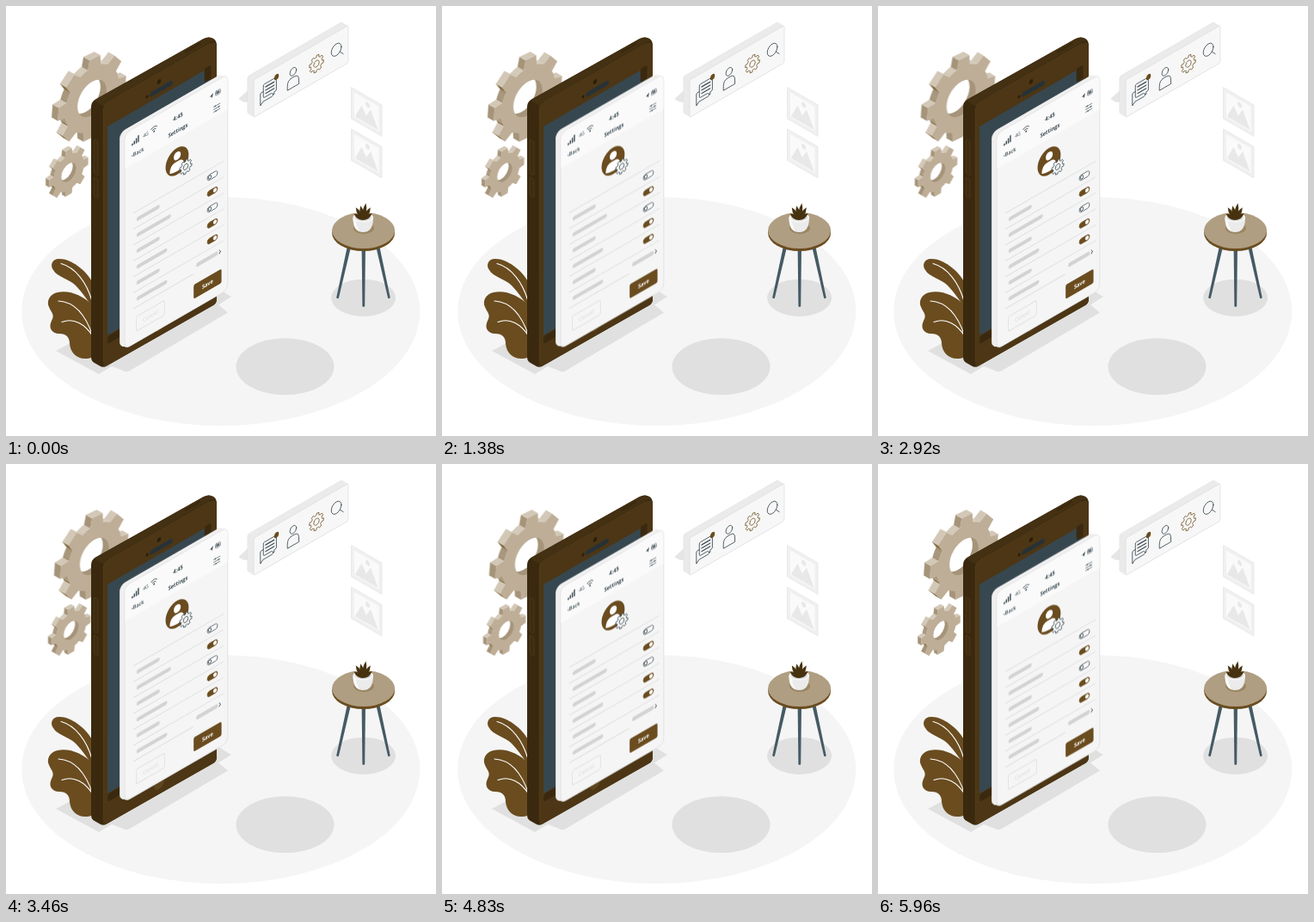
An HTML page that plays this animation: 500x500 px, repeating every 6000 ms.

```html
<!DOCTYPE html>
<html lang="en">
<head>
<meta charset="utf-8">
<title>Settings</title>
<style>
  html, body { margin: 0; width: 100%; height: 100%; overflow: hidden; background: #fff; }
  svg { display: block; width: 100vw; height: 100vh; }
  text { font-family: "Open Sans", "Noto Sans", sans-serif; font-weight: 700; fill: #37474f; }
  .mid { text-anchor: middle; }
  .line { fill: none; stroke: #37474f; stroke-width: .8; stroke-linecap: round; stroke-linejoin: round; }
  #panel { animation: float 1.5s linear -40ms infinite; }
  #gears { animation: shake 6s linear -40ms infinite; }
  @keyframes float {
    50% { transform: translateY(-10px); }
  }
  @keyframes shake {
    0%, 100% { transform: translateX(0); }
    10%, 90% { transform: translateX(-1px); }
    20%, 80% { transform: translateX(2px); }
    30%, 50%, 70% { transform: translateX(-4px); }
    40%, 60% { transform: translateX(4px); }
  }
</style>
</head>
<body>
<svg viewBox="0 0 500 500">
  <!-- floor and shadows -->
  <ellipse cx="249.7" cy="355" rx="231.5" ry="133" fill="#f5f5f5"/>
  <g fill="#e0e0e0">
    <ellipse cx="324.5" cy="419.3" rx="57" ry="33"/>
    <ellipse cx="415.6" cy="339.3" rx="37.5" ry="21.6"/>
    <path d="M58 401L104 376 245 328 262 338 247 347.500 258 356.500 144 424Q140 426.500 136 424L123 419 108 428Z"/>
  </g>

  <!-- wall pictures -->
  <g id="pictures"></g>

  <!-- leaves -->
  <g fill="#6a4c1f">
    <path d="M101 322C93 307 76 294 62 294 53 294 51 302 55 307 59 315 73 317 81 325 89 333 96 344 101 351Z"/>
    <path d="M102 349C89 336 73 330 60 333 50 335 47 344 50 350 53 357 57 359 53 366 49 374 53 381 62 381 70 381 74 385 74 393 75 403 82 410 92 410 98 410 103 408 104 404Z"/>
    <g fill="none" stroke="#fff" stroke-width="1.1" stroke-linecap="round">
      <path d="M64 299.500C81 304 94 322 100 343"/>
      <path d="M61 343C80 344 93 360 101 384M65 367.500C79 362 92 370 101 384"/>
    </g>
  </g>

  <g id="gears"></g>

  <!-- phone -->
  <path d="M99 117Q99 111.500 104 108.500L229 38.500Q236 34.800 241.500 38.200 245 40.500 245 46V341Q245 345.500 241 348L117 418.500Q113 421 109 418.500L102 414.500Q99 412.500 99 408Z" fill="#3a290f"/>
  <path d="M102.500 110L229 38.500Q236 34.800 241.500 38.200L243 41Q239 41 235 43.300L118 111.500Q115 113.500 114 116.500Z" fill="#443012"/>
  <path d="M113 122Q113 115 118.500 111.700L236 44Q245 39.500 245 48V341Q245 345.500 241 348L117 418.500Q113 421 113 415Z" fill="#4c3615"/>
  <path d="M113.200 413V122Q113.200 115.500 118.500 111.700L236 44" fill="none" stroke="#5c441f" stroke-width=".5"/>
  <path d="M208 52.500L226 42.200V44.800L208 55.200Z" fill="#3a290f"/>
  <g fill="#3f2c10" stroke="#57411d" stroke-width=".6">
    <path d="M102 156Q104 154 107 158V196Q103 197 102 193Z"/>
    <path d="M102 200Q104 198 107 202V222Q103 223 102 219Z"/>
  </g>
  <g transform="matrix(.866 -.5 0 1 113 120)">
    <rect x="5.800" y="23" width="138" height="243" fill="#37474f"/>
    <path d="M15 26V266" stroke="#465a64" stroke-width=".6" stroke-dasharray="1 2"/>
    <rect x="136" y="21" width="9" height="16" rx="2" fill="#3a290f"/>
    <rect x="6" y="267" width="138" height="9" rx="3" fill="#3a290f"/>
    <rect x="62.500" y="12.500" width="31" height="5.400" rx="2.700" fill="#263238"/>
    <circle cx="75" cy="5.500" r="2.600" fill="#2b1e0a"/>
    <circle cx="59" cy="15" r="1.700" fill="#2b1e0a"/>
    <circle cx="75" cy="288.500" r="7" fill="#5f451d"/>
  </g>

  <!-- settings panel -->
  <g id="panel">
    <g id="sheet"></g>
    <g transform="matrix(.866 -.5 0 1 138 144)">
      <path d="M.5 46V12.500Q.5 5.500 8 5.500H130Q138 5.500 138 12.500V46Z" fill="#fafafa"/>
      <g fill="#37474f">
        <rect x="9.500" y="21.500" width="1.600" height="2.500"/>
        <rect x="12.200" y="19.800" width="1.600" height="4.200"/>
        <rect x="14.900" y="18" width="1.600" height="6"/>
        <rect x="17.600" y="16" width="1.600" height="8"/>
        <path d="M114 19.700L119 17 117.300 22.500 116.500 20Z"/>
        <circle cx="39.500" cy="22" r="1"/>
        <rect x="122.800" y="18" width="4.600" height="3" rx=".5" opacity=".8"/>
      </g>
      <path class="line" d="M37.300 19.900Q39.500 18 41.700 19.900M35.600 18Q39.500 14.700 43.400 18"/>
      <rect class="line" x="121.800" y="17" width="6.800" height="5" rx="1.200" style="stroke-width:.5"/>
      <path class="line" d="M119.500 33.700H128M119.500 36.700H128M119.500 39.700H128" style="stroke-width:.6"/>
      <path class="line" d="M121.500 33.300V34.100M126 36.300V37.100M122.500 39.300V40.100" style="stroke-width:1.200"/>
      <text x="24.500" y="22.300" font-size="5.800" style="font-weight:400">4G</text>
      <text class="mid" x="71.600" y="23.300" font-size="6.600">4:45</text>
      <text class="mid" x="71.600" y="39" font-size="6.500">Settings</text>
      <text x="9.300" y="37.500" font-size="6.200" style="font-weight:600">‹Back</text>

      <circle cx="70.400" cy="72.200" r="15.500" fill="#6a4c1f"/>
      <g fill="#fff">
        <circle cx="70.600" cy="66" r="4.700"/>
        <path d="M60.500 82Q60.500 72.500 68 72.500H73Q80 72.500 80 82Q70 86 60.500 82Z"/>
      </g>
      <g id="badge" transform="translate(82 84.500)"></g>
      <g id="rows"></g>

      <path class="line" d="M127 204L128.800 206 127 208"/>
      <rect x="92.600" y="227" width="37.400" height="16.600" rx="2" fill="#6a4c1f"/>
      <text class="mid" x="111.300" y="237.600" font-size="6.500" style="fill:#fff">Save</text>
      <rect x="15.500" y="225.500" width="38" height="17" rx="2.500" fill="none" stroke="#e0e0e0"/>
      <text class="mid" x="34.500" y="236.300" font-size="6.500" style="fill:#e0e0e0;font-weight:600">Cancel</text>
    </g>
  </g>

  <!-- icon banner -->
  <path d="M284 96L271 108 276 111 288 112Z" fill="#e6e6e6" stroke="#dcdcdc" stroke-width=".6"/>
  <g id="banner"></g>
  <g transform="matrix(.866 -.5 0 1 288 86)">
    <g class="line">
      <path d="M13 20V13.500Q13 12 14.500 12H29Q30.500 12 30.500 13.500V26Q30.500 27.500 29 27.500H27.500V30.500L24 27.500H14.500Q13 27.500 13 26Z"/>
      <path d="M16 16H27.500M16 19.800H27.500M16 23.600H27.500" style="stroke-width:1.300"/>
      <path d="M13 20H10.500Q9 20 9 21.500V34.500L12.500 31.500H24.500Q26 31.500 26 30V29.500"/>
      <circle cx="53" cy="16.800" r="4.400"/>
      <path d="M45.300 34.500V30.300Q45.300 23.400 51 23.400H55Q60.700 23.400 60.700 30.300V34.500Z"/>
      <circle cx="111" cy="20.300" r="6.800"/>
      <path d="M116 25.300L120.300 29.800"/>
    </g>
    <circle cx="30.600" cy="11.800" r="3.200" fill="#6a4c1f"/>
    <g id="cog" transform="translate(84.300 23.300)"></g>
  </g>

  <!-- table -->
  <g fill="#455a64">
    <path d="M397 279H401.300L386.900 339.500Q385.300 341 384.200 339Z"/>
    <path d="M430 279H434.200L446.700 339Q445.700 341 444.100 339.500Z"/>
    <path d="M413.600 280H418L417.200 349Q415.800 351 414.400 349Z"/>
  </g>
  <ellipse cx="415.600" cy="264" rx="36.500" ry="21" fill="#6a4c1f"/>
  <ellipse cx="415.600" cy="261" rx="36.500" ry="21" fill="#b09e82"/>
  <ellipse cx="416" cy="258.500" rx="12" ry="6.500" fill="#9c8763"/>
  <path d="M403.500 246Q403.500 263 415.300 263T427 246Z" fill="#ebebeb"/>
  <path d="M403.500 246Q403.500 260 411 262.300Q407 255 407 248Z" fill="#fafafa"/>
  <ellipse cx="415.300" cy="246" rx="11.800" ry="5.500" fill="#f5f5f5"/>
  <ellipse cx="415.300" cy="246" rx="9.500" ry="4" fill="#d8d8d8"/>
  <g id="sprout" fill="#46320f"></g>
</svg>
<script>
  const brown = '#6a4c1f', slate = '#37474f';
  const plane = (x, y) => `matrix(.866 -.5 0 1 ${x} ${y})`;
  const put = (id, markup) => document.getElementById(id).insertAdjacentHTML('beforeend', markup);
  const toPath = pts => 'M' + pts.map(p => p.map(n => n.toFixed(2)).join(' ')).join('L') + 'Z';

  // A rounded slab on the front plane, swept back by (dx, dy).
  function slab(x, y, w, h, r, dx, dy, side, face, edge) {
    const rect = (k, fill, stroke) =>
      `<rect transform="${plane(x + dx * k, y + dy * k)}" width="${w}" height="${h}" rx="${r}" fill="${fill}" stroke="${stroke}" stroke-width=".7"/>`;
    const steps = Math.ceil(-dx * 2);
    let out = rect(1, side, edge);
    for (let i = steps - 1; i > 0; i--) out += rect(i / steps, side, side);
    return out + rect(0, face, edge);
  }

  function toothed(r, root, phase) {
    const pts = [], step = Math.PI / 4;
    for (let i = 0; i < 8; i++) {
      const a = i * step + phase;
      for (const [f, d] of [[-.31, root], [-.2, r], [.2, r], [.31, root]])
        pts.push([Math.cos(a + f * step) * d, Math.sin(a + f * step) * d]);
      for (const f of [.42, .5, .58])
        pts.push([Math.cos(a + f * step) * root, Math.sin(a + f * step) * root]);
    }
    return pts;
  }

  function solidGear(id, cx, cy, r, root, hole, phase, dx, dy) {
    const pts = toothed(r, root, phase).map(([u, v]) => [cx + u * .866, cy - u * .5 + v]);
    let sides = '';
    pts.forEach(([x, y], i) => {
      const [p, q] = pts[(i + 1) % pts.length];
      const nx = q - y, ny = x - p;
      if (nx * dx + ny * dy <= 0) return;
      const up = -ny / Math.hypot(nx, ny);
      const fill = up > .45 ? '#d3c8b7' : up > -.35 ? '#a59479' : '#866e46';
      sides += `<path d="${toPath([[x, y], [p, q], [p + dx, q + dy], [x + dx, y + dy]])}" fill="${fill}" stroke="${fill}" stroke-width=".3"/>`;
    });
    const ring = (x, y, fill) => `<circle transform="${plane(x, y)}" r="${hole}" fill="${fill}"/>`;
    put('gears', `<clipPath id="${id}">${ring(cx, cy, '#000')}</clipPath>${sides}
      <path d="${toPath(pts)}" fill="#beae97"/>${ring(cx, cy, '#a59479')}
      <g clip-path="url(#${id})">${ring(cx + dx, cy + dy, '#fff')}</g>`);
  }
  solidGear('bigHole', 100, 107.5, 46, 36, 19.5, .09, -7, -4);
  solidGear('smallHole', 73, 193.5, 26.5, 20.5, 10, 0, -4, -2.3);

  const cogIcon = (r, color, fill) =>
    `<g fill="${fill}" stroke="${color}" stroke-width=".75" stroke-linejoin="round">
      <path d="${toPath(toothed(r, r * .76, .2))}"/><circle r="${r * .38}"/></g>`;
  put('badge', cogIcon(8.3, slate, '#f5f5f5'));
  put('cog', cogIcon(9.7, brown, 'none'));

  put('sheet', slab(138, 149, 138.4, 250.5, 7, -5.5, -1, '#f0f0f0', '#f5f5f5', '#dedede'));
  put('banner', slab(288, 86, 127, 43.5, 2, -7, -4, '#ebebeb', '#f7f7f7', '#dcdcdc'));

  const bar = (x, y, w) => `<rect x="${x}" y="${y - 2.3}" width="${w}" height="4.6" rx="2" fill="#d3d3d3"/>`;
  function toggle(y, on) {
    return `<rect x="111" y="${y - 3.1}" width="13.600" height="6.200" rx="3.100" fill="${on ? brown : '#fafafa'}" stroke="${on ? brown : slate}" stroke-width=".7"/>
      <circle cx="${on ? 121.3 : 114.3}" cy="${y}" r="2" fill="#fff" stroke="${on ? '#fff' : slate}" stroke-width=".8"/>`;
  }
  const widths = [31, 46, 31, 41, 31, 41];
  for (let i = 0; i <= 6; i++) {
    const y = 103.3 + i * 18.5;
    put('rows', `<path d="M11.500 ${y}H${i < 6 ? 132.8 : 92}" stroke="#dcdcdc" stroke-width=".9"/>`);
    if (i < 6) put('rows', bar(16, y + 9.5, widths[i]));
    if (i < 5) put('rows', toggle(y + 9.4, i % 2 || i > 3));
  }
  put('rows', bar(96, 206.2, 29));

  for (const y of [94.5, 143]) put('pictures', `
    <g transform="matrix(.866 .5 0 1 401.500 ${y})">
      <rect width="41" height="36.500" fill="#f0f0f0" stroke="#e6e6e6" stroke-width=".7"/>
      <rect x="4" y="4" width="33" height="28.500" fill="#fafafa"/>
      <path d="M5 31.500L14 14 20 23 26 13 36 31.500Z" fill="#e8e8e8"/>
      <circle cx="22" cy="9.500" r="3" fill="#e8e8e8"/>
    </g>`);

  for (const [angle, size] of [[-55, 13], [52, 13], [-30, 17], [30, 17], [-10, 17], [9, 20]])
    put('sprout', `<path transform="translate(415.300 249) rotate(${angle})" d="M0 0Q-4.500 ${-size * .5} 0 ${-size}Q4.500 ${-size * .5} 0 0Z"/>`);
</script>
</body>
</html>
```
